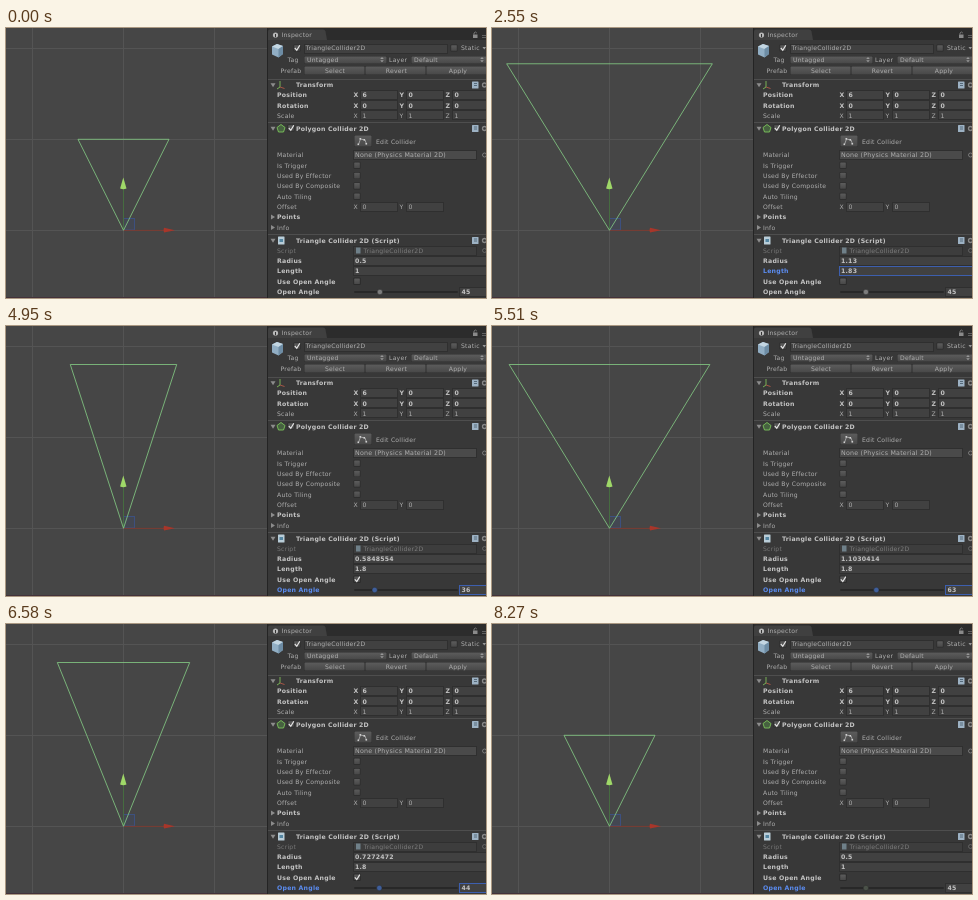
An HTML page for the animation above (8.47 s loop, 480 px wide and 270 px high).

```html
<!DOCTYPE html>
<html lang="en">
<head>
<meta charset="utf-8">
<title>Triangle collider inspector</title>
<style>
html, body { margin: 0; width: 100%; height: 100%; overflow: hidden; background: #383838; }
svg { display: block; width: 480px; height: 270px; }
text { font: 6.1px "DejaVu Sans", Verdana, sans-serif; letter-spacing: .23px; fill: #b0b0b0; text-rendering: geometricPrecision; white-space: pre; }
text.b { font-weight: bold; font-size: 6.2px; fill: #c4c4c4; }
</style>
</head>
<body>
<svg id="stage" viewBox="0 0 480 270" xmlns="http://www.w3.org/2000/svg"></svg>
<script>
const LOOP = 8470, UNIT = 91, OX = 117.5, OY = 202.3;
const BLUE = '#5b8cf0', BOLD = '#c4c4c4', EDGE = '#2f2f2f';
const stage = document.getElementById('stage');

function add(tag, attrs, content) {
  const el = document.createElementNS('http://www.w3.org/2000/svg', tag);
  for (const k in attrs) el.setAttribute(k, attrs[k]);
  if (content !== undefined) el.textContent = content;
  return stage.appendChild(el);
}
const rect = (x, y, width, height, fill, more) => add('rect', { x, y, width, height, fill, ...more });
const path = (d, stroke, fill = 'none', w = 1) => add('path', { d, stroke, fill, 'stroke-width': w });
const put = (x, mid, s, more) => add('text', { x, y: mid + 2.3, ...more }, s);
const bold = (x, mid, s) => put(x, mid, s, { class: 'b' });
const ring = (cy, w) => add('circle', { cx: 478.5, cy, r: 2, fill: 'none', stroke: '#888', 'stroke-width': w });
const field = (x, mid, w, fill = '#414141') =>
  rect(x + .5, Math.round(mid - 5) + .5, w - 1, 9, fill, { stroke: EDGE });
function button(x, mid, w, h = 9) {
  const y = Math.round(mid - h / 2);
  rect(x, y, w, h, '#2f2f2f', { rx: 1.5 });
  rect(x + .5, y + .5, w - 1, h - 1, 'url(#shade)', { rx: 1 });
}
const fold = (mid, open) => path(open
  ? `M264.5 ${mid - 1.8}h5l-2.5 4z` : `M265 ${mid - 2.5}v5l4-2.5z`, 'none', '#8c8c8c');
function check(x, mid, on) {
  rect(x - 3.5, mid - 3.5, 7, 7, '#2b2b2b', { rx: 1 });
  rect(x - 2.8, mid - 2.8, 5.6, 5.6, 'url(#shade)', { rx: .5 });
  return on ? path(`M${x - 2.2} ${mid}l2 2.3 3-5`, '#e4e4e4', 'none', 1.2) : null;
}
function header(y, title) {
  rect(262, Math.floor(y - 6), 218, 1, '#4e4e4e');
  fold(y, true);
  bold(290, y, title);
  rect(466, y - 3.5, 6.5, 7, '#9db2c4', { rx: .5 });
  path(`M468 ${y - 1.5}h3M468 ${y + .5}h3`, '#455868', 'none', .8);
  ring(y, 1.3);
}

const shade = add('linearGradient', { id: 'shade', x2: 0, y2: 1 });
['#5c5c5c', '#484848'].forEach((c, offset) => {
  shade.appendChild(add('stop', { offset, 'stop-color': c }));
});

// Scene view
rect(0, 0, 261, 270, '#464646');
for (let i = 0; i < 3; i++) {
  rect(26 + i * UNIT, 0, 1, 270, '#545454');
  rect(0, 20 + i * UNIT, 261, 1, '#545454');
}
rect(0, 269, 261, 1, '#43323a');
rect(117.5, 190.5, 11, 11.5, '#3b4a74', { 'fill-opacity': .25, stroke: '#3d5285', 'stroke-width': .9 });
path('M117.5 202V160', '#46703f', 'none', .9);
path('M117.5 202.4H159', '#7d382d', 'none', .9);
const tri = path('', '#86cf86', 'none', .8);
path('M117.3 149.5l3.2 11q-3.2 1.4-6.4 0z', 'none', '#9fd868');
path('M169 202.2l-11-2.4q-1 2.4 0 4.8z', 'none', '#a8362a');

// Inspector frame and tab
rect(261, 0, 219, 270, '#383838');
rect(261, 0, 1, 270, '#242424');
rect(262, 0, 218, 12, '#2c2c2c');
path('M262 12V3.500q0-2 2-2H317q2 0 2.500 2L321 12z', 'none', '#404040');
add('circle', { cx: 269.5, cy: 7, r: 2.6, fill: '#b8b8b8' });
rect(269, 6, 1, 3, '#333');
put(275.5, 7, 'Inspector');
rect(467, 6.5, 4.5, 3.5, '#8a8a8a');
path('M468 6.500V5q1.500-2 2.800 0', '#8a8a8a', 'none', .8);
path('M476 7.500h4M476 9.500h4', '#777', 'none', .7);

// Object header
path('M266 18.500l5-2.500 6 2v8l-4.500 3.500-6.500-3z', 'none', '#91aec4');
path('M266 18.500l5-2.500 6 2-4.500 3z', 'none', '#c3d6e2');
path('M272.500 21l4.500-3v8l-4.500 3.500z', 'none', '#6d8ca4');
check(291, 20, true);
field(298, 20.5, 144);
put(299.5, 20, 'TriangleCollider2D');
check(448, 20);
put(455, 20, 'Static');
path('M476.500 19h3.500l-1.700 2.500z', 'none', '#999');
put(281.5, 31.5, 'Tag');
button(298, 31.5, 83, 8);
put(301, 31.2, 'Untagged');
put(383, 31.5, 'Layer');
button(405, 31.5, 77, 8);
put(408, 31.2, 'Default');
for (const x of [376, 476]) path(`M${x - 1.8} 31l1.800-2 1.800 2zM${x - 1.8} 32.200l1.800 2 1.800-2z`, 'none', '#999');
put(274.5, 42.5, 'Prefab');
['Select', 'Revert', 'Apply'].forEach((s, i) => {
  button(298 + i * 61, 42.5, 61);
  put(329 + i * 61.5, 42.5, s, { 'text-anchor': 'middle' });
});

// Transform
header(57, 'Transform');
path('M274 53v6l-3 2', '#7fbf5a', 'none', .9);
path('M274 59l4.500 1.500', '#b05a48', 'none', .9);
[['Position', 6, 0, 0], ['Rotation', 0, 0, 0], ['Scale', 1, 1, 1]].forEach(([name, ...v], row) => {
  const y = 67 + row * 10.2, w = row < 2 ? bold : put;
  w(271, y, name);
  v.forEach((n, i) => {
    const x = 347.5 + i * 46;
    w(x, y, 'XYZ'[i]);
    field(x + 6.5, y, 38);
    w(x + 9, y, n);
  });
});

// Polygon collider
header(100.5, 'Polygon Collider 2D');
path('M275 96.500l4 3-1.500 4.500h-5l-1.500-4.500z', '#7cc45c', '#466140', .9);
check(285, 100, true);
button(348, 113, 18, 12);
path('M352.500 116.500l2-5.500 4.500 1 1.500 4', '#b5b5b5', 'none', .8);
for (const [x, y] of [[352, 116], [354, 110.5], [358, 111.5], [360, 115.5]]) rect(x - .5, y - .5, 1.6, 1.6, '#d0d0d0');
put(370, 113.3, 'Edit Collider');
put(271, 127, 'Material');
field(347, 127, 124, '#4a4a4a');
put(349, 127, 'None (Physics Material 2D)', { style: 'font-size:6.3px' });
ring(127, .8);
['Is Trigger', 'Used By Effector', 'Used By Composite', 'Auto Tiling'].forEach((s, i) => {
  put(271, 137.3 + i * 10.3, s);
  check(351, 137.3 + i * 10.3);
});
put(271, 178.7, 'Offset');
['X', 'Y'].forEach((s, i) => {
  put(347.5 + i * 46, 178.7, s);
  field(354 + i * 46, 178.7, 38);
  put(356.5 + i * 46, 178.7, '0');
});
fold(189, false);
bold(271, 189, 'Points');
fold(199.5, false);
put(271, 199.5, 'Info');

// Triangle collider script
header(212.5, 'Triangle Collider 2D (Script)');
rect(272, 208.5, 6.5, 8, '#b9cdd8', { rx: .5 });
rect(273.5, 211, 3.5, 3, '#5486a2');
put(271, 222.5, 'Script', { style: 'fill:#777' });
field(347, 222.5, 124, '#3d3d3d');
rect(350, 219.5, 4.5, 6, '#6f8089');
put(357.5, 222.5, 'TriangleCollider2D', { style: 'fill:#7d7d7d' });
ring(222.5, .5);
const ROWS = { radius: 232.7, length: 243, toggle: 253.3, angle: 264 };
const labels = {
  radius: bold(271, ROWS.radius, 'Radius'),
  length: bold(271, ROWS.length, 'Length'),
  toggle: bold(271, ROWS.toggle, 'Use Open Angle'),
  angle: bold(271, ROWS.angle, 'Open Angle')
};
const boxes = {
  radius: field(347, ROWS.radius, 135),
  length: field(347, ROWS.length, 135),
  angle: field(453, ROWS.angle, 29)
};
const values = {
  radius: bold(349, ROWS.radius, ''),
  length: bold(349, ROWS.length, ''),
  angle: bold(455.5, ROWS.angle, '')
};
check(351, ROWS.toggle);
const mark = check(351, ROWS.toggle, true);
rect(348, 263, 104, 2, '#282828', { rx: 1 });
const knob = add('circle', { cy: 264, r: 2.7, stroke: '#2b2b2b', 'stroke-width': .5 });

// Bursts of dragging: start, end, number of updates
const BURSTS = [[430, 790, 7], [940, 1350, 8], [1530, 1630, 3], [2090, 2680, 11], [2830, 3420, 12],
  [4310, 4390, 2], [4950, 4950, 1], [5100, 5920, 12], [5970, 6760, 15], [6890, 7220, 7], [8270, 8270, 1]];
const RADIUS = [[430, .5], [790, 1.32], [890, 1.32], [1350, .63], [1480, .63], [1630, 1.13]];
const LENGTH = [[2090, 1], [2500, 1.83], [2565, 1.83], [2680, 2.18], [2780, 2.18], [3200, 1.86], [3420, 1.8]];
const ANGLE = [[4949, 45], [4950, 36], [5050, 36], [5550, 68], [5920, 36], [6020, 26], [6080, 26],
  [6200, 20], [6760, 61], [6840, 61], [7220, 23]];
const FOCUS = [[0, ''], [430, 'radius'], [2090, 'length'], [4310, 'toggle'], [4950, 'angle']];

function lastUpdate(t) {
  let at = 0;
  for (const [a, b, n] of BURSTS) {
    if (t < a) break;
    const step = n > 1 ? (b - a) / (n - 1) : 1;
    at = a + Math.min(n - 1, Math.floor((t - a) / step + 1e-6)) * step;
  }
  return at;
}
function sample(keys, t) {
  const i = keys.findIndex(k => k[0] > t);
  if (i < 0) return keys[keys.length - 1][1];
  if (i === 0) return keys[0][1];
  const [t0, a] = keys[i - 1], [t1, b] = keys[i];
  return a + (b - a) * (t - t0) / (t1 - t0);
}
const round2 = v => Math.round(v * 100) / 100;

function draw(time) {
  const t = lastUpdate(time + .01), reset = t >= 8270;
  const open = t >= 4389.9 && !reset;
  const length = reset ? 1 : round2(sample(LENGTH, t));
  const angle = reset ? 45 : Math.round(sample(ANGLE, t));
  let radius = reset ? .5 : round2(sample(RADIUS, t));
  if (open) radius = Math.floor(length * Math.tan(angle * Math.PI / 360) * 1e7) / 1e7;
  const focus = FOCUS.filter(f => f[0] <= t + .1).pop()[1];

  const top = OY - length * UNIT, half = radius * UNIT;
  tri.setAttribute('d', `M${OX} ${OY}L${OX - half} ${top}H${OX + half}Z`);
  for (const k in labels) labels[k].style.fill = k === focus ? BLUE : BOLD;
  for (const k in boxes) boxes[k].setAttribute('stroke', k === focus && !reset ? '#3d5fae' : EDGE);
  values.radius.textContent = radius;
  values.length.textContent = length;
  values.angle.textContent = angle;
  mark.style.display = open ? '' : 'none';
  knob.setAttribute('cx', 347.8 + angle * .58);
  knob.setAttribute('fill', reset ? '#4a5148' : focus === 'angle' ? '#3f5f9c' : '#7c7c7c');
}

const start = performance.now();
function loop() {
  draw((performance.now() - start) % LOOP);
  requestAnimationFrame(loop);
}
draw(0);
requestAnimationFrame(loop);
</script>
</body>
</html>
```
